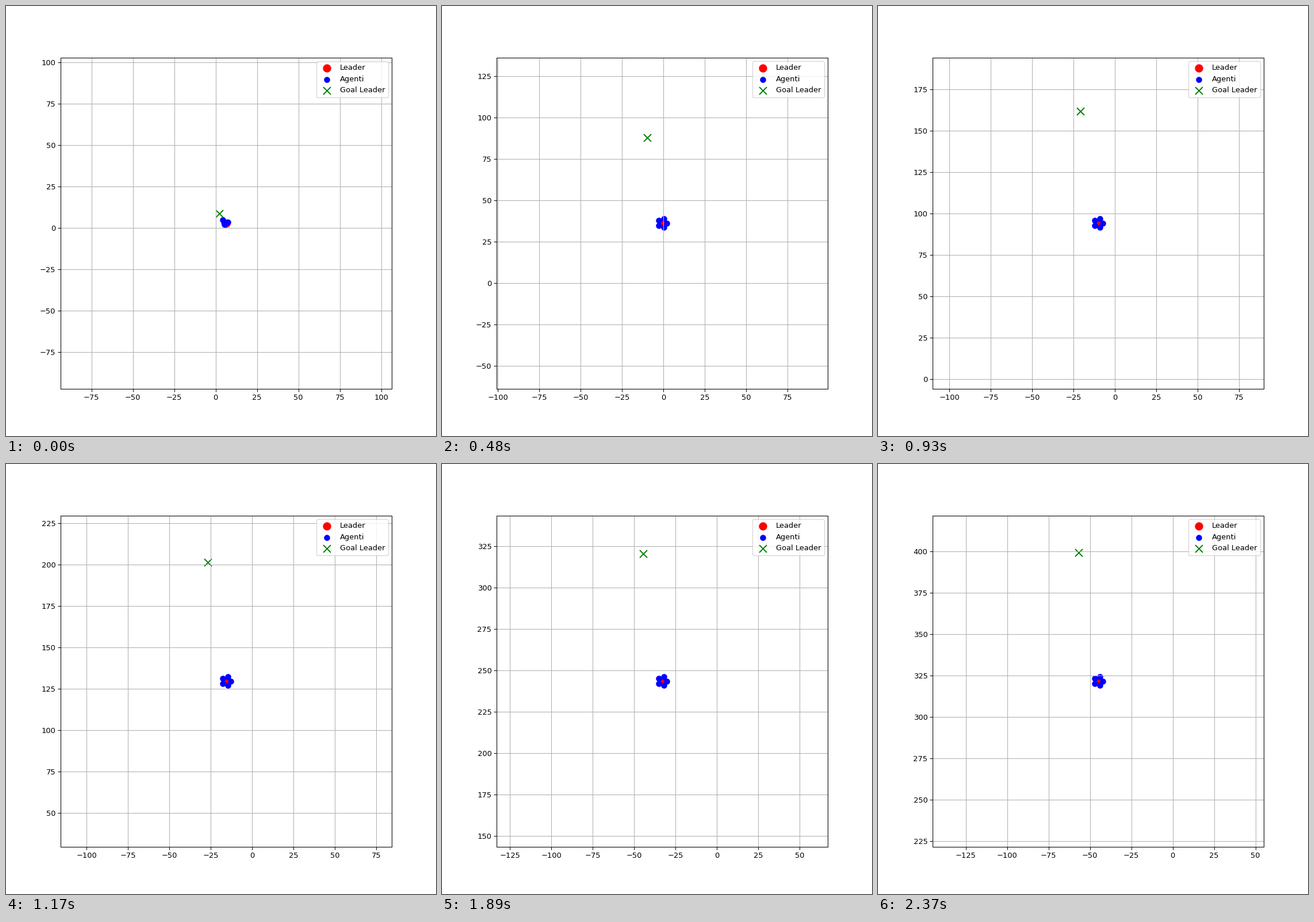
A matplotlib script for the animation above (2400 ms loop, 748 by 748 pixels).

```python
import numpy as np
import matplotlib.pyplot as plt
from matplotlib.animation import FuncAnimation

FRAMES, INTERVAL = 80, 30
VIEW = 100                                # half width of the window

GOAL_START = np.array([2.27, 8.52])
GOAL_STEP = np.array([-0.746, 4.947])     # goal moves in a straight line

# Vector from leader to goal: eases from its first to its steady value.
GAP_START = np.array([-4.2, 5.8])
GAP_END = np.array([-11.85, 78.25])
GAP_DECAY = 0.9395

# Agents settle from a loose cluster into a ring around the leader.
RING_RADIUS = 2.8
ANGLES = 2 * np.pi * np.arange(5) / 5
RING = RING_RADIUS * np.column_stack([np.cos(ANGLES), np.sin(ANGLES)])
CLUSTER = np.array([[0.75, 0.75], [-1.4, 0.6], [-2.2, 1.85],
                    [-1.2, -0.7], [-1.0, -0.3]])
RING_DECAY = 0.75


def ease(start, end, decay, n):
    return end + (start - end) * decay ** n


def scene(n):
    goal = GOAL_START + GOAL_STEP * n
    leader = goal - ease(GAP_START, GAP_END, GAP_DECAY, n)
    agents = leader + ease(CLUSTER, RING, RING_DECAY, n)
    return leader, agents, goal


fig, ax = plt.subplots(figsize=(8, 8), dpi=93.5)
ax.set_aspect("equal")
ax.grid(True)

leader_dot = ax.scatter([], [], s=100, c="red", label="Leader")
agent_dots = ax.scatter([], [], s=50, c="blue", label="Agenti")
goal_mark = ax.scatter([], [], s=100, c="green", marker="x",
                       label="Goal Leader")
ax.legend(loc="upper right")


def update(n):
    leader, agents, goal = scene(n)
    leader_dot.set_offsets([leader])
    agent_dots.set_offsets(agents)
    goal_mark.set_offsets([goal])
    ax.set_xlim(leader[0] - VIEW, leader[0] + VIEW)
    ax.set_ylim(leader[1] - VIEW, leader[1] + VIEW)
    return leader_dot, agent_dots, goal_mark


anim = FuncAnimation(fig, update, frames=FRAMES, interval=INTERVAL,
                     repeat=True, repeat_delay=0, blit=False)
plt.show()
```
